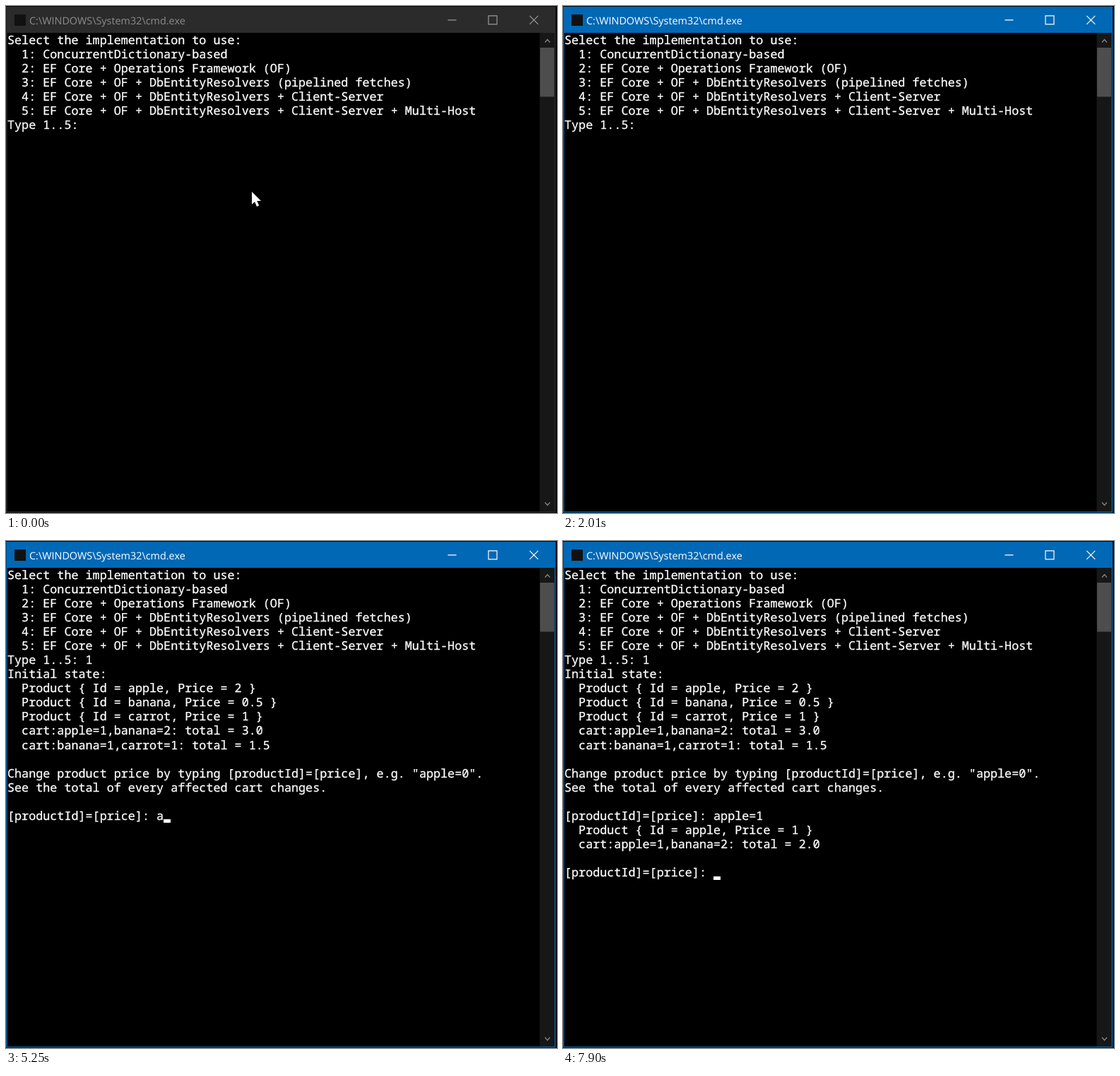
Write an HTML page that moves like this. It is 780 px wide and 718 px high and loops after 8000 ms.

```html
<!DOCTYPE html>
<html lang="en">
<head>
<meta charset="utf-8">
<title>Console</title>
<style>
  html, body { margin: 0; width: 100%; height: 100%; overflow: hidden; background: #000; }
  svg { display: block; }
  text { text-rendering: geometricPrecision; white-space: pre; }
  #title { font: 14.4px "Open Sans", sans-serif; }
  #screen { font: 16.75px "Noto Sans Mono", monospace; font-variant-ligatures: none; fill: #fff; stroke: #fff; stroke-width: .3; }
  #bar { fill: #2b2b2b; }
  #frame { fill: none; stroke: #2b2b2b; stroke-width: 1.4; }
  #title { fill: #8c8c8c; }
  #buttons { fill: none; stroke: #999; stroke-width: 1.2; }
  #mouse { fill: #fff; stroke: #000; stroke-width: 1.6; paint-order: stroke; }
  .active #bar { fill: #0068b5; }
  .active #frame { stroke: #0068b5; }
  .active #title { fill: #fff; }
  .active #buttons { stroke: #fff; }
</style>
</head>
<body>
<svg id="win" width="780" height="718" viewBox="0 0 780 718">
  <rect width="780" height="718"/>
  <rect id="bar" x="1" y="1" width="777" height="37"/>
  <rect x="12" y="12" width="16" height="16" fill="#111"/>
  <text id="title" x="33" y="25.7">C:\WINDOWS\System32\cmd.exe</text>
  <path id="buttons" d="M625.5 19.8h12M683 13.8h12v12h-12zM741.3 13.8l12 12M753.3 13.8l-12 12"/>
  <rect x="755.5" y="38" width="21.5" height="678" fill="#171717"/>
  <rect x="756" y="59" width="20" height="69.5" fill="#4d4d4d"/>
  <path d="M763 51.5l3.5-4 3.5 4M763 703l3.5 4 3.5-4" fill="none" stroke="#888" stroke-width="1.2"/>
  <rect id="frame" x="1" y="1.6" width="776.4" height="715"/>
  <g id="screen"></g>
  <rect id="caret" width="10" height="5" fill="#fff"/>
  <path id="mouse" d="M0 0V18L4.1 14.2 7 21 10.2 19.6 7.3 13H13z"/>
</svg>
<script>
const LOOP = 8000, CELL = 10.05, LINE = 20.08, LEFT = 2, TOP = 37.8, ROWS = 22;
const PROMPT = "\n[productId]=[price]: ";

// time, text written to the console, caret visible
const output = [
  [0, `Select the implementation to use:
  1: ConcurrentDictionary-based
  2: EF Core + Operations Framework (OF)
  3: EF Core + OF + DbEntityResolvers (pipelined fetches)
  4: EF Core + OF + DbEntityResolvers + Client-Server
  5: EF Core + OF + DbEntityResolvers + Client-Server + Multi-Host
Type 1..5: `, false],
  [1390, "", true],
  [2010, "", false],
  [2610, "1\n", true],
  [2810, `Initial state:
  Product { Id = apple, Price = 2 }
  Product { Id = banana, Price = 0.5 }
  Product { Id = carrot, Price = 1 }
  cart:apple=1,banana=2: total = 3.0
  cart:banana=1,carrot=1: total = 1.5
`, true],
  [3630, `
Change product price by typing [productId]=[price], e.g. "apple=0".
See the total of every affected cart changes.
`, false],
  [4020, PROMPT, false],
  [4640, "", true],
  [5250, "a", true],
  [5470, "p", true],
  [5650, "p", false],
  [5840, "le", true],
  [6260, "", false],
  [6460, "=", true],
  [6860, "", false],
  [7270, "1", true],
  [7490, `
  Product { Id = apple, Price = 1 }
  cart:apple=1,banana=2: total = 2.0
`, true],
  [7900, PROMPT, true]
];

// time, pointer tip
const pointer = [[0, 348, 263], [200, 277, 58], [380, 278, 18], [600, 277, 18], [1010, 319, 11], [1200, -50, -50]];

const $ = id => document.getElementById(id);
const place = (el, x, y) => el.setAttribute("transform", `translate(${x} ${y})`);

const rows = Array.from({ length: ROWS }, (_, i) => {
  const row = document.createElementNS("http://www.w3.org/2000/svg", "text");
  row.setAttribute("x", LEFT);
  row.setAttribute("y", TOP + i * LINE + 15.8);
  return $("screen").appendChild(row);
});

function draw() {
  const t = performance.now() % LOOP;
  const past = list => list.filter(([time]) => time <= t);

  const written = past(output);
  const lines = written.map(e => e[1]).join("").split("\n");
  rows.forEach((row, i) => {
    const line = lines[i] || "";
    if (row.textContent !== line) row.textContent = line;
  });

  const last = lines.length - 1;
  place($("caret"), Math.round(LEFT + lines[last].length * CELL), Math.round(TOP + (last + 1) * LINE) - 5);
  $("caret").style.display = written.at(-1)[2] ? "" : "none";

  const [, x, y] = past(pointer).at(-1);
  place($("mouse"), x, y);
  $("win").classList.toggle("active", t >= 1010);
  requestAnimationFrame(draw);
}
draw();
</script>
</body>
</html>
```
